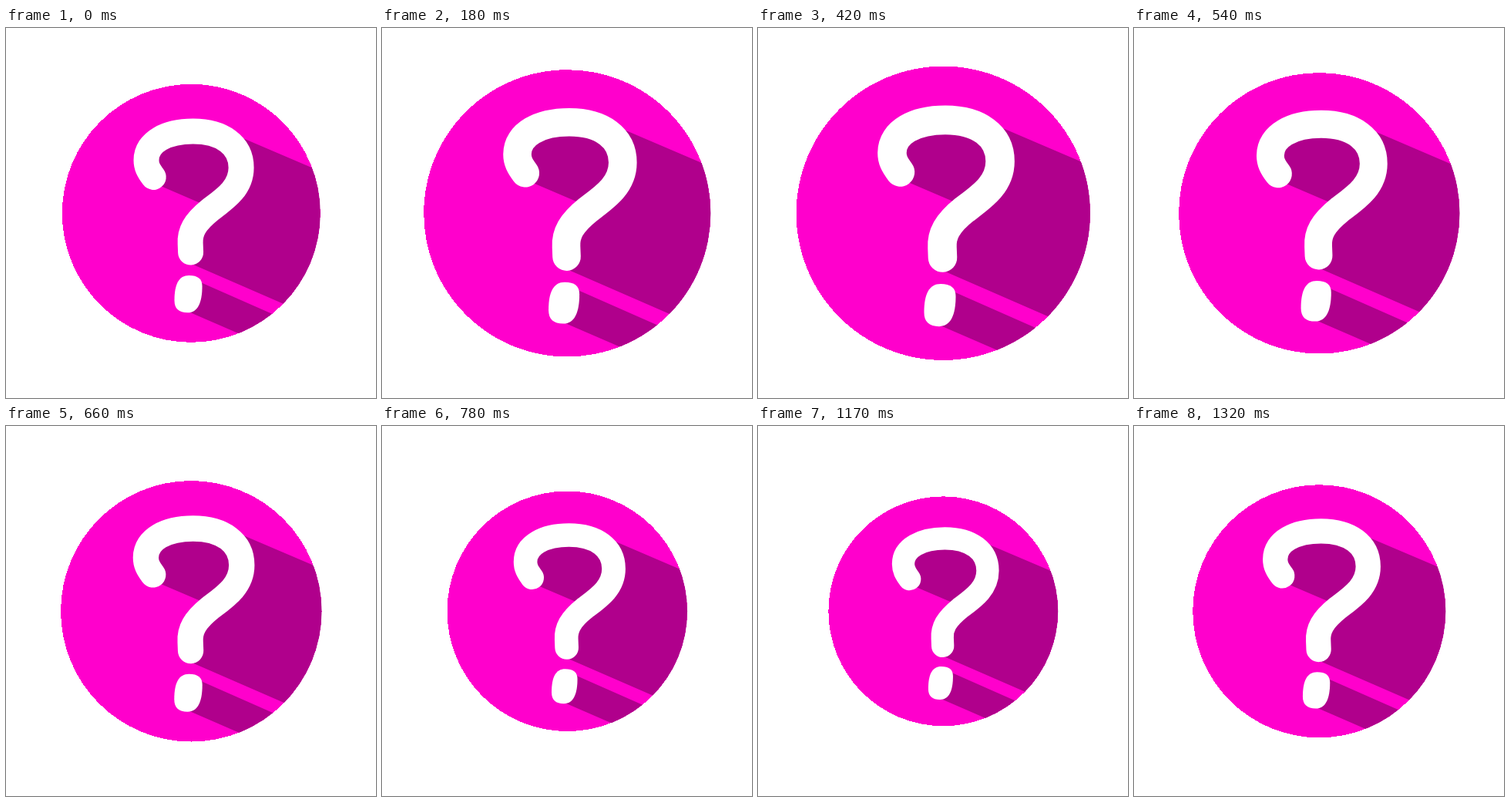
Recreate the animation shown at these times as an HTML page. Size 480x480 px, loop 1.35 s.

```html
<!DOCTYPE html>
<html lang="en">
<head>
<meta charset="utf-8">
<title>Pulsing question mark</title>
<style>
  html, body { margin: 0; width: 100%; height: 100%; overflow: hidden; background: #fff; }
  svg { display: block; width: 100vw; height: 100vh; }
</style>
</head>
<body>
<svg viewBox="0 0 480 480">
  <defs>
    <clipPath id="disc"><circle r="190.5" cx="240.3" cy="240.3" shape-rendering="crispEdges"/></clipPath>
  </defs>
  <g id="badge">
    <circle r="190.5" cx="240.3" cy="240.3" fill="#ff00cc" shape-rendering="crispEdges"/>
    <g clip-path="url(#disc)" fill="#b0008c">
      <path d="M190 198 L256 226.2 L240 300 V314.8 L440 401.8 V182.4 L310 126.9 L243 119 L200 128 L174 155 V162Z"/>
      <path d="M240 336 L440 424.2 V474 L236 385.5Z"/>
    </g>
    <path d="M184.5 187 C177 177 174 171 174 162 C174 135 204 119.5 243 119.5 C286 119.5 314 140 314 173
             C314 203 290 219 268 235.5 C245 254 238 268 239 285 L239.5 298"
          fill="none" stroke="#fff" stroke-width="37.5" stroke-linecap="round" stroke-linejoin="round"/>
    <path d="M237 332 C250 332 256.5 337 256.5 348 C256.5 372 250 387 235 387 C222 387 215.5 381 215.5 369 C215.5 345 222 332 237 332Z" fill="#fff"/>
  </g>
</svg>
<script>
  const LOOP = 1350, STEP = 30, CENTER = 240.3;
  const badge = document.getElementById('badge');

  function draw(now) {
    const t = Math.floor((now % LOOP) / STEP) * STEP;
    const radius = 167.5 + 25 * Math.sin(2 * Math.PI * t / LOOP);
    const s = radius / 190.5;
    const shift = CENTER * (1 - s);
    badge.setAttribute('transform', `translate(${shift} ${shift}) scale(${s})`);
  }

  const start = performance.now();
  function tick() {
    draw(performance.now() - start);
    requestAnimationFrame(tick);
  }
  tick();
</script>
</body>
</html>
```
